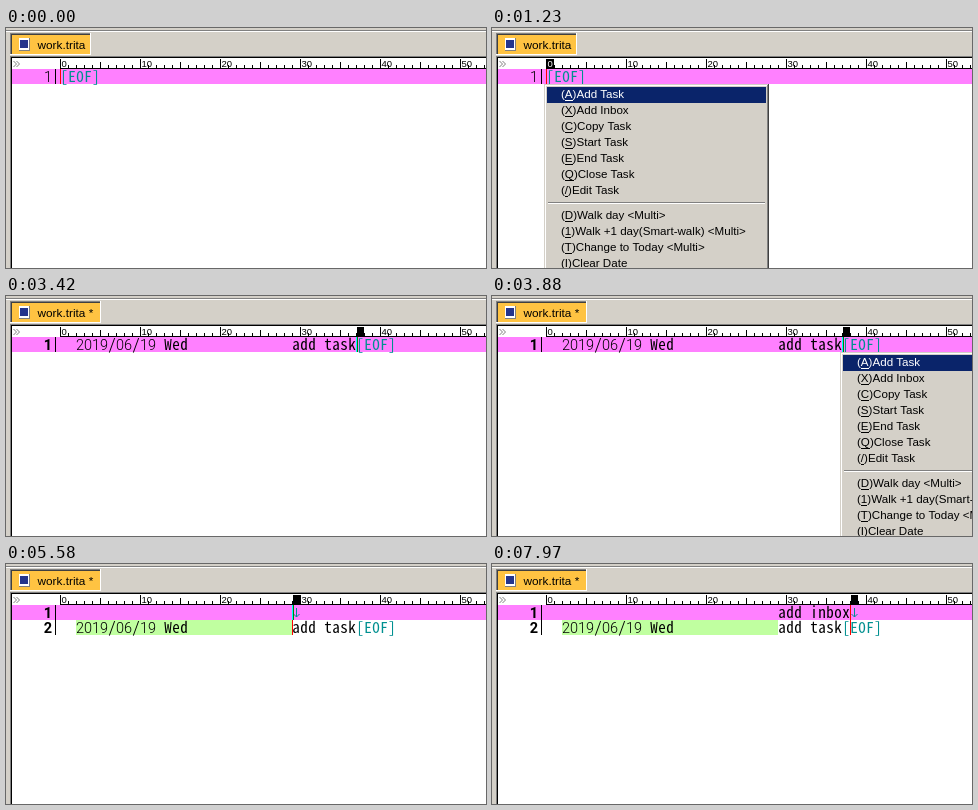
Recreate the animation shown at these times as an HTML page with a canvas. Size 480 by 240 pixels, loop 8 s.

```html
<!DOCTYPE html>
<html lang="en">
<head>
<meta charset="utf-8">
<title>Text editor task menu</title>
<style>
html, body { margin: 0; width: 480px; height: 240px; overflow: hidden; background: #fff; }
canvas { display: block; }
</style>
</head>
<body>
<canvas id="stage" width="480" height="240"></canvas>
<script>
const ctx = document.getElementById('stage').getContext('2d');
const LOOP = 8000, LEFT = 54, CELL = 8, TOP = 41, ROW = 15, NAME_COL = 29;
const FACE = '#d4d0c8', PINK = '#ff80ff', GREEN = '#c0ffa0', TEAL = '#009090', NAVY = '#0a246a';
const SANS = '"Liberation Sans", Arial, sans-serif';
const MONO = '"Noto Sans Mono CJK JP", "Noto Sans Mono", monospace';
const DIGITS = 'Roboto, "Liberation Sans", sans-serif';
const UI = '11.6px ' + SANS;
const DATE = '2019/06/19 Wed', TASK = 'add task', INBOX = 'add inbox', EOF = '[EOF]';
const MENU = ['(A)Add Task', '(X)Add Inbox', '(C)Copy Task', '(S)Start Task', '(E)End Task',
  '(Q)Close Task', '(/)Edit Task', '', '(D)Walk day <Multi>',
  '(1)Walk +1 day(Smart-walk) <Multi>', '(T)Change to Today <Multi>', '(I)Clear Date'];

// Keystroke times; a repeated time enters two letters at once.
const TASK_KEYS = [2580, 2730, 2880, 3000, 3140, 3270, 3270, 3420];
const INBOX_KEYS = [6390, 6540, 6690, 6810, 6960, 7120, 7420, 7420, 7570];

const colX = col => LEFT + col * CELL;
const rowY = row => TOP + row * ROW;
const typed = (text, keys, t) => text.slice(0, keys.filter(k => k <= t).length);
const within = (t, a, b) => t >= a && t < b;

function box(x, y, w, h, color) {
  ctx.fillStyle = color;
  ctx.fillRect(x, y, w, h);
}

function label(text, x, y, font, color = '#000', align = 'left') {
  ctx.font = font;
  ctx.fillStyle = color;
  ctx.textAlign = align;
  ctx.fillText(text, x, y);
}

// Fixed grid text; digits use another face for an open zero.
function gridText(text, col, row, color = '#000', weight = 300) {
  [...text].forEach((ch, i) => {
    const font = /\d/.test(ch) ? '14.5px ' + DIGITS : '15px ' + MONO;
    label(ch, colX(col + i) + CELL / 2, rowY(row) + 13, weight + ' ' + font, color, 'center');
  });
}

function strokePath(color, ...lines) {
  ctx.strokeStyle = color;
  ctx.lineWidth = 1;
  ctx.beginPath();
  for (const [first, ...rest] of lines) {
    ctx.moveTo(...first);
    for (const p of rest) ctx.lineTo(...p);
  }
  ctx.stroke();
}

function drawTab(edited) {
  const w = edited ? 91 : 81;
  box(0, 0, 480, 240, FACE);
  box(0, 2, 480, 1, '#808080');
  box(0, 3, 480, 1, '#fff');
  box(4, 5, w, 22, '#fff');
  box(4, 5, w - 1, 21, '#808080');
  box(5, 6, w - 2, 20, '#404040');
  box(6, 7, w - 3, 19, '#ffc342');
  box(13, 10, 11, 13, '#808080');
  box(13, 10, 10, 12, '#fff');
  box(14, 12, 8, 8, '#24348c');
  label(edited ? 'work.trita *' : 'work.trita', 31.5, 21, '11.8px ' + SANS);
}

function drawRuler(col, marked) {
  box(4, 28, 476, 212, '#808080');
  box(5, 29, 475, 211, '#000');
  box(6, 30, 474, 210, '#fff');
  for (const x of [7.5, 10.5]) strokePath('#808080', [[x, 33], [x + 3, 36], [x, 39]]);
  box(LEFT, 40, 426, 1, '#000');
  for (let i = 0; colX(i) < 480; i++) {
    const h = i % 10 === 0 ? 9 : i % 5 === 0 ? 6 : 3;
    box(colX(i), 40 - h, 1, h, '#000');
    if (i % 10 === 0) label(i, colX(i) + 1.5, 38.5, '9.5px ' + SANS);
  }
  if (marked) {
    ctx.globalCompositeOperation = 'difference';
    box(colX(col) + 1, 31, CELL - 1, 9, '#fff');
    ctx.globalCompositeOperation = 'source-over';
  }
}

function drawGutter(row, edited) {
  gridText(String(row + 1), -2, row, '#000', edited ? 700 : 300);
  box(49, rowY(row), 1, ROW, '#000');
}

function drawLineEnd(col, row) {
  const x = colX(col) + 4.5, y = rowY(row);
  strokePath(TEAL, [[x, y + 3], [x, y + 12]], [[x - 3, y + 9], [x, y + 12], [x + 3, y + 9]]);
}

function drawMenu(x, chosen) {
  const w = 225, y = 56;
  box(x, y, w, 184, '#404040');
  box(x, y, w - 1, 184, FACE);
  box(x + 1, y + 1, w - 2, 183, '#808080');
  box(x + 1, y + 1, w - 3, 183, '#fff');
  box(x + 2, y + 2, w - 4, 182, FACE);
  let top = y + 3;
  MENU.forEach((item, i) => {
    if (!item) {
      box(x + 4, top + 3, w - 8, 1, '#808080');
      box(x + 4, top + 4, w - 8, 1, '#fff');
      top += 9;
      return;
    }
    const color = i === chosen ? '#fff' : '#000';
    if (i === chosen) box(x + 3, top, w - 6, 16, NAVY);
    label(item, x + 17, top + 11, UI, color);
    const lead = ctx.measureText('(').width, key = ctx.measureText(item[1]).width;
    box(Math.round(x + 17 + lead), top + 13, Math.round(key), 1, color);
    top += 16;
  });
}

function draw(t) {
  const edited = t >= 2170, split = t >= 5580;
  const task = typed(TASK, TASK_KEYS, t), inbox = typed(INBOX, INBOX_KEYS, t);
  const col = edited ? NAME_COL + (split ? inbox : task).length : 0;
  const caretOn = !(t < 520 || within(t, 1110, 2170) || within(t, 6110, 6390) || t >= 7970);
  const lines = split ? 2 : 1, last = lines - 1;

  drawTab(edited);
  drawRuler(col, t >= 520);
  box(6, TOP, 474, ROW, PINK);
  if (split) box(colX(2), rowY(1), colX(NAME_COL) - colX(2), ROW, GREEN);
  for (let i = 0; i < lines; i++) drawGutter(i, edited);

  if (edited) {
    gridText(DATE, 2, last);
    gridText(task, NAME_COL, last);
  }
  gridText(EOF, edited ? NAME_COL + task.length : 0, last, TEAL);
  if (split) {
    gridText(inbox, NAME_COL, 0);
    drawLineEnd(col, 0);
  }

  box(colX(col), TOP, 1, ROW * lines, '#f00');
  if (caretOn) {
    box(colX(col), TOP, 1, ROW, '#0ff');
    box(colX(col) + 1, TOP, 1, ROW, '#007f00');
  }

  if (within(t, 1230, 2170)) drawMenu(colX(0) - 2, 0);
  if (within(t, 3880, 5580)) drawMenu(colX(col) - 2, t < 4310 ? 0 : 1);
}

const start = performance.now();
function frame() {
  draw((performance.now() - start) % LOOP);
  requestAnimationFrame(frame);
}
frame();
</script>
</body>
</html>
```
